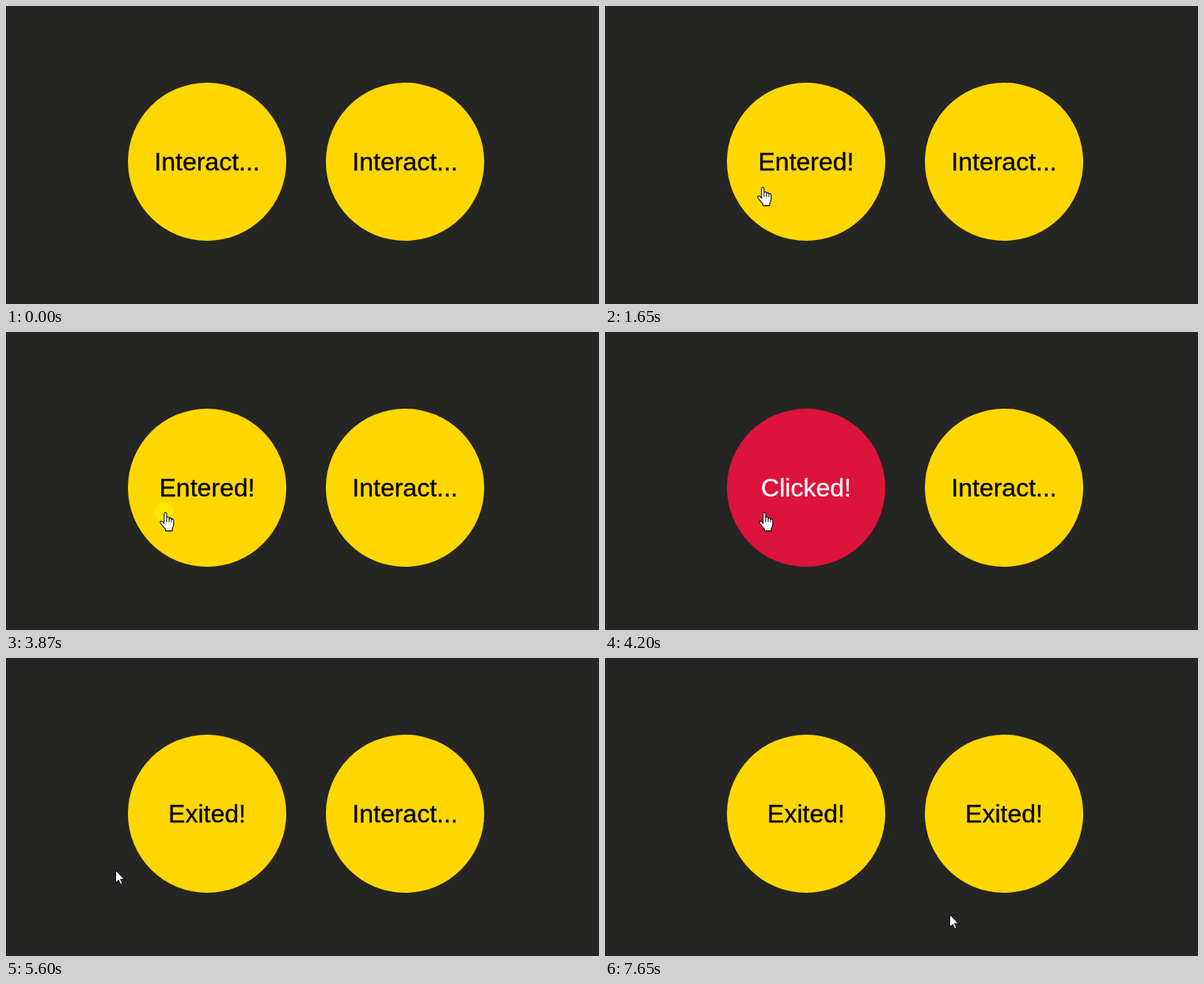
An HTML page that plays this animation: 749 px wide and 377 px high, repeating every 8 s.

```html
<!DOCTYPE html>
<html lang="en">
<head>
<meta charset="utf-8">
<title>Interactive circles</title>
<style>
  html, body { margin: 0; width: 100%; height: 100%; overflow: hidden; background: #252523; }
  svg { display: block; width: 749px; height: 377px; }
  text {
    font: 32px "Liberation Sans", Arial, sans-serif;
    text-anchor: middle;
    fill: currentColor;
    stroke: currentColor;
    stroke-width: .3;
  }
  #arrow, #hand { fill: #fff; stroke: #000; stroke-linejoin: round; }
</style>
</head>
<body>
<svg viewBox="0 0 749 377">
  <g id="left"><circle cx="254" cy="197" r="100"/><text x="254" y="208"></text></g>
  <g id="right"><circle cx="504" cy="197" r="100"/><text x="504" y="208"></text></g>
  <g id="pointer">
    <circle id="press" r="12" fill="#ff0" opacity=".45"/>
    <path id="arrow" d="M.5 .5V16.5L4.2 13 6.7 18.5 9 17.5 6.6 12H11.5Z"/>
    <path id="hand" transform="translate(-6 0) scale(1.05)" d="M5.5 13.5V2.2Q5.5 .5 7 .5T8.5 2.2V7Q8.7 5.6 10 5.7T11.5 7.2V8Q11.8 6.6 13 6.8T14.3 8.2V9Q14.6 7.8 15.6 8T17 9.6V14.5Q17 17 15.2 19.5V22.5H7.2V20.5Q4 17 1 12.8Q.3 11 2 10.7T5.5 13.5ZM8.5 7V12M11.5 8V12M14.3 9V12"/>
  </g>
</svg>
<script>
const LOOP = 8000;
const STEP = 70;
const byId = id => document.getElementById(id);

// Eased pointer sweeps along quadratic curves; the pointer rests in between.
const sweep = (start, end, from, bend, to) => ({ start, end, from, bend, to });
const sweeps = [
  sweep(520, 1010, [318, 366], [170, 355], [71, 315]),
  sweep(1080, 1650, [74, 306], [188, 242], [198, 229]),
  sweep(2310, 2590, [176, 246], [145, 268], [129, 287]),
  sweep(3050, 3540, [130, 286], [165, 247], [200, 228]),
  sweep(5330, 5800, [198, 229], [140, 272], [109, 279]),
  sweep(6000, 6420, [111, 283], [230, 385], [453, 350]),
  sweep(6550, 6900, [470, 338], [482, 318], [484, 262]),
  sweep(7300, 7650, [482, 268], [470, 312], [435, 324])
];

const event = (start, label) => ({ start, label });
const events = {
  left: [
    event(0, "Interact..."), event(1440, "Entered!"), event(2380, "Exited!"),
    event(3330, "Entered!"), event(4200, "Clicked!"), event(5530, "Exited!")
  ],
  right: [event(0, "Interact..."), event(6830, "Entered!"), event(7440, "Exited!")]
};

const latest = (list, t) => list.findLast(item => item.start <= t);
const show = (id, on) => byId(id).setAttribute("display", on ? "inline" : "none");
const smooth = u => u * u * (3 - 2 * u);

function pointOn({ start, end, from, bend, to }, t) {
  const steps = Math.round((end - start) / STEP);
  const done = Math.floor((t - start) / (end - start) * steps + 1e-6);
  const u = smooth(Math.min(1, done / steps));
  const v = 1 - u;
  return from.map((p, i) => Math.round(v * v * p + 2 * u * v * bend[i] + u * u * to[i]));
}

function drawButton(id, t) {
  const { label } = latest(events[id], t);
  const clicked = label === "Clicked!";
  const [circle, text] = byId(id).children;
  circle.setAttribute("fill", clicked ? "#dc143c" : "#ffd700");
  text.style.color = clicked ? "#fff" : "#000";
  if (text.textContent !== label) text.textContent = label;
  return clicked || label === "Entered!";
}

function drawPointer(t, hovering) {
  const current = latest(sweeps, t);
  show("pointer", current);
  if (!current) return;
  byId("pointer").setAttribute("transform", `translate(${pointOn(current, t)})`);
  show("hand", hovering);
  show("arrow", !hovering);
  show("press", t >= 3870 && t < 4200);
}

const origin = performance.now();
function draw(now) {
  const t = Math.max(0, now - origin) % LOOP;
  const overLeft = drawButton("left", t);
  const overRight = drawButton("right", t);
  drawPointer(t, overLeft || overRight);
  requestAnimationFrame(draw);
}
draw(origin);
</script>
</body>
</html>
```
